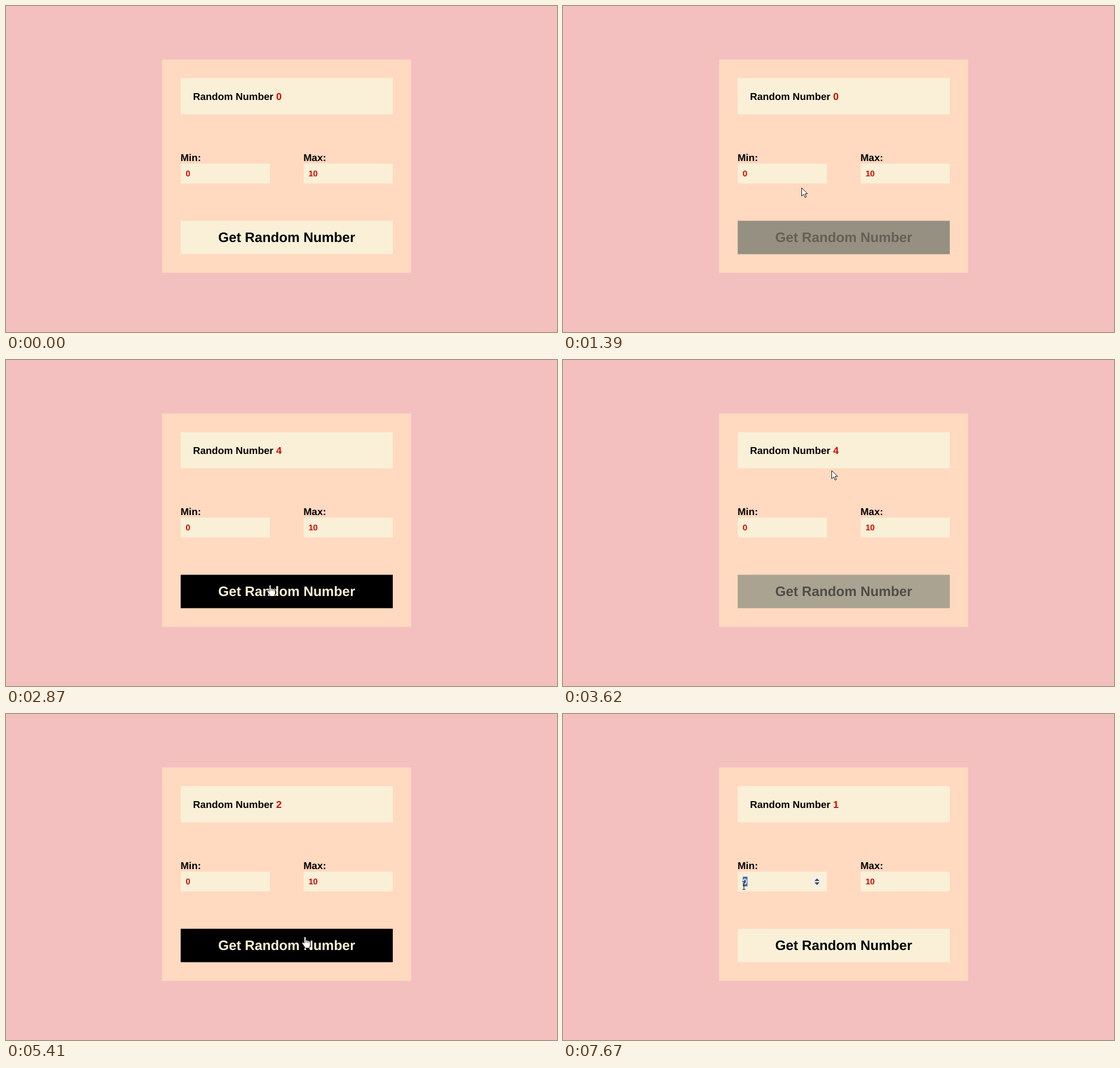
An HTML page for the animation above (8000 ms loop, 973 by 576 pixels).

```html
<!DOCTYPE html>
<html lang="en">
<head>
<meta charset="utf-8">
<title>Random Number</title>
<style>
  html, body { margin: 0; width: 100%; height: 100%; overflow: hidden; background: #f4bfbf; }
  svg { display: block; width: 973px; height: 576px; }
  text { font: bold 17.6px "Liberation Sans", Arial, sans-serif; white-space: pre; text-rendering: geometricPrecision; }
  .card { fill: #ffd9c0; }
  .box { fill: #faf0d7; }
  .red { fill: #d00a00; }
  .field { font-size: 14.667px; }
  #label { font-size: 24.2px; text-anchor: middle; }
  .cursor { fill: #fff; stroke: #111; stroke-linejoin: round; }
</style>
</head>
<body>
<svg viewBox="0 0 973 576">
  <rect class="card" x="275.5" y="94.5" width="440" height="377"/>
  <rect class="box" x="308.5" y="127.5" width="374.5" height="64"/>
  <text x="330.3" y="165.500">Random Number <tspan id="number" class="red">0</tspan></text>

  <text x="308.2" y="273.500">Min:</text>
  <text x="525.2" y="273.500">Max:</text>
  <rect id="minBox" class="box" x="308.5" y="278.5" width="157.500" height="35"/>
  <rect class="box" x="525.5" y="278.5" width="157.500" height="35"/>
  <rect id="selection" x="317.5" y="287.5" width="8.200" height="17" fill="#3d64ae"/>
  <text id="min" class="field red" x="317.2" y="300.500">0</text>
  <text class="field red" x="534.2" y="300.500">10</text>
  <g id="spinner">
    <rect x="440.5" y="287.5" width="16" height="17" fill="#efefef"/>
    <path d="M444 295 448.500 290.500 453 295ZM444 297.500 448.500 302 453 297.500Z" fill="#444"/>
  </g>

  <rect id="button" class="box" x="308.5" y="379.5" width="374.5" height="59"/>
  <text id="label" x="495.700" y="416.500">Get Random Number</text>

  <g id="cursor">
    <path id="arrow" class="cursor" d="M.5 .5V15L4 11.700 6.500 17.300 8.800 16.300 6.400 10.900H11Z"/>
    <g id="hand">
      <path class="cursor" d="M-1.500 12V2Q-1.500 .5 0 .5T1.500 2V7Q3.500 5.700 4.300 7.500 6 6.600 6.800 8.400 9.300 7.500 9.300 10V14.500Q9.300 17 7.500 18.500V20.500H-.5V19L-5 12.500Q-5.500 10.500-4 10.200-2.800 10.200-1.500 12Z"/>
      <path d="M1.500 7V11M4.300 8V11M6.800 9V11.500" fill="none" stroke="#111" stroke-width=".8"/>
    </g>
    <path id="beam" d="M-3-7H3M0-7V7M-3 7H3" fill="none" stroke="#222"/>
  </g>
</svg>
<script>
const LOOP = 8000, FADE = 500, ENTER = 380, DRAG = 7140, SELECT = 7380;
const CREAM = "#faf0d7", BLACK = "#000000";
const $ = id => document.getElementById(id);
const show = (id, on) => { $(id).style.display = on ? "" : "none"; };

// Key points of the pointer: time, x, y
const path = [
  [ENTER, 878, 566], [640, 646, 433], [1210, 435, 382], [1390, 421, 321],
  [1520, 417, 304], [1764, 446, 380], [1920, 463, 397], [3300, 468, 397],
  [3425, 470, 379], [3620, 474, 195], [3950, 485, 153], [4090, 485, 153],
  [4480, 521, 380], [4610, 526, 402], [4940, 528, 393], [6160, 528, 393],
  [6438, 443, 379], [6540, 420.5, 361.5], [6930, 378, 306], [DRAG, 383, 306],
  [7450, 298, 310], [7670, 319.5, 303]
];
// Result shown after each click: time, value
const results = [[0, 0], [2400, 4], [4870, 7], [5280, 2], [5680, 9], [6160, 1]];

function pointer(t) {
  const i = path.findIndex(p => p[0] > t);
  if (i < 0) return path[path.length - 1].slice(1);
  const [t0, x0, y0] = path[i - 1], [t1, x1, y1] = path[i];
  const k = (t - t0) / (t1 - t0);
  return [x0 + (x1 - x0) * k, y0 + (y1 - y0) * k];
}

function isOver(id, [x, y]) {
  const box = $(id).getBBox();
  return x >= box.x && x < box.x + box.width && y >= box.y && y < box.y + box.height;
}

// Times at which the pointer enters or leaves the button
const crossings = [];
for (let t = ENTER, was = false; t < LOOP; t += 2) {
  const over = isOver("button", pointer(t));
  if (over !== was) crossings.push(t);
  was = over;
}

function fade(id, rest, hover) {
  const frames = [{ offset: 0, fill: rest }];
  crossings.forEach((t, i) => {
    const [from, to] = i % 2 ? [hover, rest] : [rest, hover];
    frames.push({ offset: t / LOOP, fill: from, easing: "ease" },
      { offset: (t + FADE) / LOOP, fill: to });
  });
  frames.push({ offset: 1, fill: rest });
  const anim = $(id).animate(frames, { duration: LOOP, fill: "both" });
  anim.pause();
  return anim;
}
const fades = [fade("button", CREAM, BLACK), fade("label", BLACK, CREAM)];

function draw(t) {
  for (const anim of fades) anim.currentTime = t;
  $("number").textContent = results.filter(r => r[0] <= t).pop()[1];

  const visible = t >= ENTER;
  const spot = visible ? pointer(t) : [0, 0];
  const hand = isOver("button", spot);
  const beam = t >= DRAG || isOver("minBox", spot);
  show("cursor", visible);
  show("hand", hand);
  show("beam", beam);
  show("arrow", !hand && !beam);
  $("cursor").setAttribute("transform", `translate(${spot})`);

  const selected = t >= SELECT;
  show("spinner", beam);
  show("selection", selected);
  $("min").style.fill = selected ? "#e4e9f2" : "";
}

const start = performance.now();
function loop() {
  draw((performance.now() - start) % LOOP);
  requestAnimationFrame(loop);
}
loop();
</script>
</body>
</html>
```
